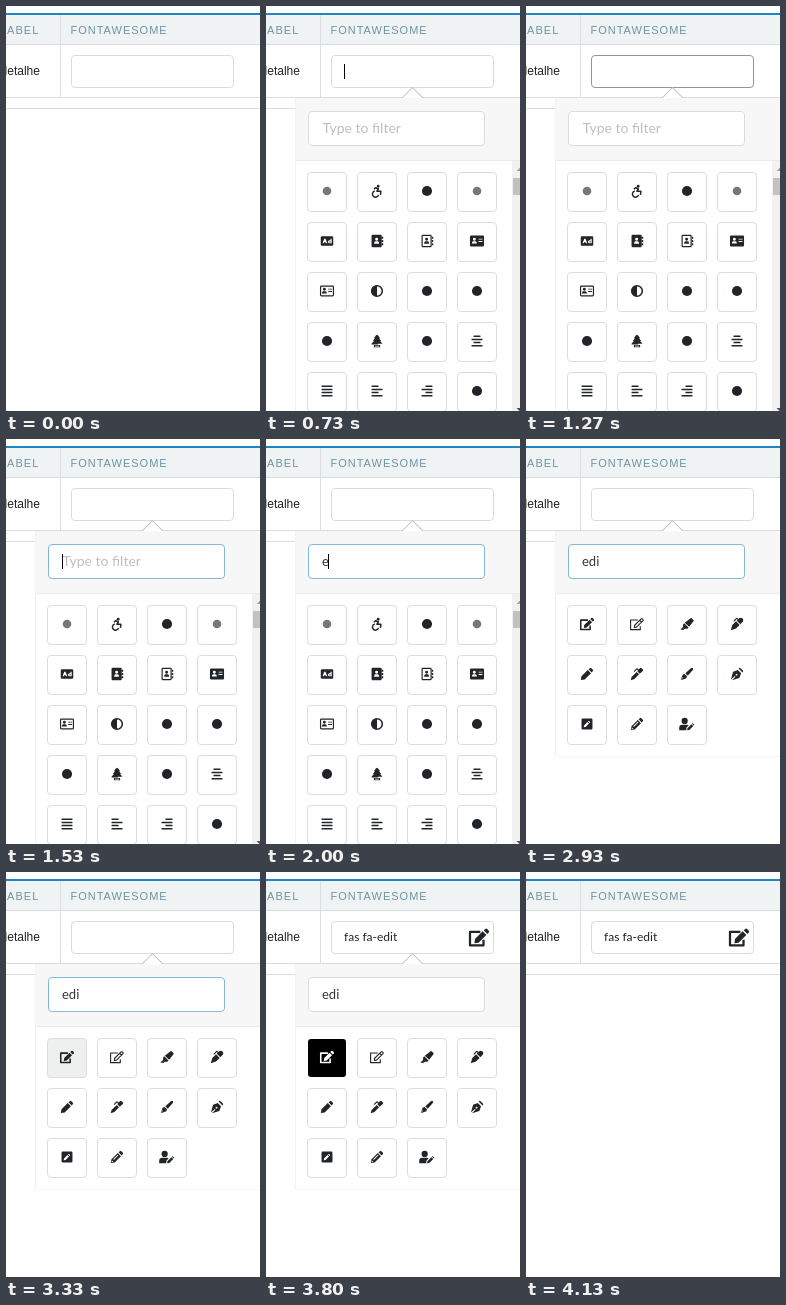
Recreate the animation shown at these times as an HTML page with a canvas. Size 254x405 px, loop 4.74 s.

```html
<!DOCTYPE html>
<html lang="pt">
<head>
<meta charset="utf-8">
<title>Icon picker</title>
<style>
  html, body { margin: 0; width: 100%; height: 100%; overflow: hidden; background: #fff; }
  canvas { display: block; }
</style>
</head>
<body>
<canvas id="stage" width="254" height="405"></canvas>
<script>
const ctx = document.getElementById('stage').getContext('2d', { alpha: false });
const LOOP = 4740;
const INK = '#212529';

// Icon geometry lives on a grid 16 units high.
const box = (x, y, w, h, r = 1.5) =>
  `M${x + r} ${y}h${w - 2 * r}q${r} 0 ${r} ${r}v${h - 2 * r}q0 ${r} ${-r} ${r}` +
  `h${2 * r - w}q${-r} 0 ${-r} ${-r}v${2 * r - h}q0 ${-r} ${r} ${-r}Z`;
const disc = (x, y, r) => `M${x - r} ${y}a${r} ${r} 0 1 0 ${2 * r} 0a${r} ${r} 0 1 0 ${-2 * r} 0Z`;
const person = (x, y) => disc(x, y, 1.9) + `M${x - 3.2} ${y + 5.6}q0-3 2-3h2.4q2 0 2 3Z`;
const bars = (shift, short = 9) =>
  [0, 1, 2, 3].map(i => box(i % 2 ? 0 : shift, 1 + 4 * i, i % 2 ? 14 : short, 2, .4)).join('');
const cap = 'M10 2 11.7.5Q12.7-.3 13.6.5L15.5 2.4Q16.3 3.3 15.5 4.3L14 6Z';
const tabs = [2.5, 6.7, 10.9].map(y => box(13.2, y, 1.8, 2.6, .3)).join('');

const icons = {
  disc: { fill: disc(8, 8, 6.5) },
  faintDisc: { fill: disc(8, 8, 5.5), tint: '#777' },
  wheelchair: {
    fill: disc(9.5, 1.9, 1.8),
    line: 'M4 5.5 6.5 3.8 9.8 5.4 7.8 8.3H13L12.4 13M5.2 8A4 4 0 1 0 10 13', width: 1.9
  },
  ad: {
    fill: box(0, 2, 16, 12) + 'M2.3 11 4.5 5H6.1L8.3 11H6.7L6.2 9.5H4.4L3.9 11Z' +
      'M14 5V11H11Q9.3 11 9.3 9 9.3 7 11 7H12.5V5ZM11.2 8.3H12.5V9.8H11.2Z'
  },
  book: { fill: box(0, 0, 13, 16) + person(6.5, 5.8) + tabs, w: 14 },
  bookOutline: { fill: person(6.5, 5.8) + tabs, line: box(.75, .75, 11.5, 14.5, 1), width: 1.5, w: 14 },
  card: { fill: box(0, 1, 18, 14) + person(5.6, 5.7) + box(11, 5, 5, 1.2, .2) + box(11, 8, 5, 1.2, .2), w: 18 },
  cardOutline: {
    fill: person(5.6, 5.7) + box(10.5, 5, 5, 1.2, .2) + box(10.5, 8, 5, 1.2, .2),
    line: box(.75, 1.75, 16.5, 12.5, 1), width: 1.5, w: 18
  },
  adjust: { fill: 'M8 1A7 7 0 0 0 8 15Z', line: disc(8, 8, 6.8), width: 2 },
  tree: {
    fill: 'M8 0 9.5.8 12 4.5H10.7L13.3 8H12L15 11.5H9.2V12.6H1V11.5L4 8H2.7L5.3 4.5H4L6.5.8Z' +
      'M4 13H12V16H4ZM5.4 14.1V14.9H10.6V14.1Z'
  },
  alignCenter: { fill: bars(2.5), w: 14 },
  justify: { fill: bars(0, 14), w: 14 },
  alignLeft: { fill: bars(0), w: 14 },
  alignRight: { fill: bars(5), w: 14 },
  edit: {
    fill: 'M12.3 2.5 15.5 5.7 8.6 12.6 5.2 13Q5 13 5 12.5L5.4 9.4Z' +
      'M13.2 1.6 14.5.4Q15.4-.3 16.2.4L17.7 1.9Q18.4 2.7 17.7 3.5L16.4 4.8Z',
    line: 'M10.2 3H1V15H13V10', width: 2, w: 18
  },
  editOutline: {
    line: 'M10 2.8H.8V15.2H13.2V11M5.6 12.4 6 9.6 14.3 1.3Q15 .6 15.7 1.3L16.7 2.3' +
      'Q17.4 3 16.7 3.7L8.4 12ZM12.4 3.2 14.8 5.6', width: 1.4, w: 18
  },
  highlighter: {
    fill: 'M0 15 2.6 12.4 5 14.7 4 15.8ZM3.5 8.5 5 7.1 10.4 12.4 9 14 6 14 4.7 14.8 2.7 12.8 3.5 11.5Z' +
      'M5.7 6.3 13 .5Q13.8 0 14.5.7L16.7 3Q17.4 3.7 16.8 4.5L11.2 11.6Z', w: 17
  },
  marker: {
    fill: 'M2 9.3 6.8 4.6 11.4 9.2 6.7 13.9 0 16ZM7.7 3.7 8.8 2.6 7.8 1.6 4.3 5.1 3.3 4.1 7 .4' +
      'Q7.8-.3 8.6.4L9.8 1.6 11.3.4Q13.2-.8 15.2.8 16.8 2.8 15.6 4.9L12.3 8.3Z'
  },
  pen: { fill: 'M9 3 13 7 5 15 .3 15.7Q0 15.8.2 15.4L.9 11Z' + cap },
  penAlt: {
    fill: 'M7.6 5.5 10.6 8.4 4.7 14.5 0 16 1 11.9Z' +
      'M8.5 4.5 9.2 3.4 8 2.3 4.7 5.5 3.7 4.5 7.2 1Q8 .3 8.8 1L10.1 2.3 11.8.6Q13-.3 14 .6L15.4 2Q16.3 3 15.4 4.2L11.5 7.6Z'
  },
  penFancy: { fill: 'M2.6 8.7 5 8 8 11 7.2 13.4 0 16 3.1 12.5 2.6 12 0 15.5ZM5.8 7 13 .6Q14.3-.5 15.6.5 16.6 1.7 15.4 3L9 10.2Z' },
  penNib: {
    fill: 'M10 1 11 .3Q11.8-.2 12.5.5L15.5 3.5Q16.2 4.2 15.7 5L15 6Z' +
      'M9 2.8 13.2 7 11 13 1.5 16 6 11.5 5.2 10.5.2 15 3 5Z' + disc(7.4, 8.8, 1.2)
  },
  penSquare: { fill: box(1, 1, 14, 14) + 'M8.5 5.5 10.5 7.5 6.2 11.8 3.8 12.2 4.2 9.8ZM9.3 4.7 10.3 3.8 12.2 5.7 11.3 6.7Z' },
  pencil: { fill: 'M9 3 13 7 5 15 .3 15.7.9 11ZM9 5 3 11 4.2 11.6 10 5.9ZM1.6 12.6 1.4 14.5 3.3 14.3Z' + cap },
  userEdit: {
    fill: disc(7, 4, 4) + 'M0 16V13Q0 9 4 9H10Q11.3 9 12.2 9.6L9.4 12.5 9 16Z' +
      'M15.6 8.3 18 10.7 13 15.6 10.2 16 10.5 13.3ZM16.3 7.6 17.2 6.8 19.6 9.2 18.7 10Z', w: 20
  }
};
for (const icon of Object.values(icons)) {
  icon.fill = icon.fill && new Path2D(icon.fill);
  icon.line = icon.line && new Path2D(icon.line);
}

const allIcons = ('faintDisc wheelchair disc faintDisc ad book bookOutline card cardOutline adjust ' +
  'disc disc disc tree disc alignCenter justify alignLeft alignRight disc').split(' ');
const edIcons = ('disc edit editOutline highlighter marker pen penAlt penFancy ' +
  'penNib penSquare pencil userEdit').split(' ');
const ediIcons = edIcons.slice(1);

function rect(x, y, w, h, color) {
  ctx.fillStyle = color;
  ctx.fillRect(x, y, w, h);
}

function frame(x, y, w, h, border, fill = '#fff') {
  ctx.beginPath();
  ctx.roundRect(x + .5, y + .5, w - 1, h - 1, 3.5);
  ctx.fillStyle = fill;
  ctx.fill();
  ctx.strokeStyle = border;
  ctx.lineWidth = 1;
  ctx.stroke();
}

function text(str, x, y, font, color, spacing = 0) {
  ctx.font = font;
  ctx.letterSpacing = spacing + 'px';
  ctx.fillStyle = color;
  ctx.fillText(str, x, y);
}

function triangle(x, y, halfWidth, height, color) {
  ctx.beginPath();
  ctx.moveTo(x, y);
  ctx.lineTo(x + halfWidth, y + height);
  ctx.lineTo(x - halfWidth, y + height);
  ctx.fillStyle = color;
  ctx.fill();
}

function drawIcon(name, cx, cy, size, color = INK) {
  const icon = icons[name];
  const s = size / 16;
  ctx.save();
  ctx.translate(cx - (icon.w || 16) * s / 2, cy - size / 2);
  ctx.scale(s, s);
  ctx.fillStyle = ctx.strokeStyle = icon.tint || color;
  ctx.lineWidth = icon.width || 1;
  ctx.lineJoin = 'round';
  if (icon.fill) ctx.fill(icon.fill, 'evenodd');
  if (icon.line) ctx.stroke(icon.line);
  ctx.restore();
}

function mix(a, b, k) {
  return `rgb(${a.map((v, i) => Math.round(v + (b[i] - v) * k))})`;
}

function fade(t, start) {
  return t < start ? 0 : t < start + 65 ? .25 : t < start + 130 ? .75 : 1;
}

const GREY = [218, 220, 220], DARK = [150, 150, 150], BLUE = [133, 183, 217];
const between = (t, a, b) => t >= a && t < b;

function drawPage(t) {
  rect(0, 0, 254, 405, '#fff');
  rect(0, 7, 254, 2, '#2185c5');
  rect(0, 9, 254, 29, '#eff3f3');
  rect(0, 38, 254, 1, '#d9dddd');
  rect(54, 9, 1, 82, '#dcdfdf');
  rect(0, 91, 254, 1, '#dcdcdc');
  rect(0, 102, 254, 1, '#dcdcdc');
  const head = '11px "Liberation Sans", Arial, sans-serif';
  text('LABEL', -6, 28, head, '#6d94a6', 1);
  text('FONTAWESOME', 64.5, 28, head, '#6d94a6', 1);
  text('detalhe', -5.4, 69, '12px "Liberation Sans", Arial, sans-serif', '#222');

  frame(65, 49, 163, 33, mix(GREY, DARK, fade(t, 735) - fade(t, 1400)));
  if (between(t, 730, 1270)) rect(78, 58, 1, 15, '#000');
  if (t >= 3800) {
    text('fas fa-edit', 78, 69, '12px Lato, sans-serif', '#222');
    drawIcon('edit', 213, 65.5, 18);
  }
}

function drawFilter(t) {
  const typed = t < 2000 ? '' : t < 2200 ? 'e' : t < 2400 ? 'ed' : 'edi';
  frame(42, 105, 177, 35, mix(GREY, BLUE, fade(t, 1400) - fade(t, 3600)));
  if (typed) text(typed, 56, 127, '13px Lato, sans-serif', '#333');
  else text('Type to filter', 56.5, 127, '14px Lato, sans-serif', '#bfbfbf');
  if (between(t, 1400, 2930) || between(t, 3470, 3600)) {
    rect([56, 62, 70, 73][typed.length], 115, 1, 15, '#000');
  }
}

function drawCells(t) {
  const names = t < 2330 ? allIcons : t < 2470 ? edIcons : ediIcons;
  names.forEach((name, i) => {
    const x = 41 + 50 * (i % 4), y = 166 + 50 * Math.floor(i / 4);
    const chosen = i === 0 && t >= 3730;
    if (chosen) {
      ctx.beginPath();
      ctx.roundRect(x + 1, y + 1, 38, 38, 3);
      ctx.fillStyle = '#000';
      ctx.fill();
    } else {
      frame(x, y, 40, 40, '#dcdcdc', i === 0 && t >= 3330 ? '#eeefef' : '#fff');
    }
    drawIcon(name, x + 20, y + 19, 12.5, chosen ? '#fff' : INK);
  });
}

function drawScrollbar() {
  rect(246, 155, 8, 250, '#f1f1f1');
  rect(247, 172, 7, 17, '#c1c1c1');
  triangle(254.5, 161, 4, 4, '#a3a3a3');
  triangle(254.5, 406, 4, -4, '#505050');
}

function drawPopup(t) {
  const long = t < 2330;
  const bottom = long ? 405 : 318;
  rect(29, 92, 225, bottom - 92, '#fff');
  rect(29, 92, 225, 62, '#f7f7f7');
  rect(29, 154, 225, 1, '#ebebeb');
  rect(29, 92, 1, bottom - 92, '#f2f2f2');
  if (!long) rect(29, 317, 225, 1, '#f5f5f5');
  triangle(146.5, 81, 11, 11, '#bfbfbf');
  triangle(146.5, 82.2, 10, 10, '#fff');
  drawFilter(t);
  drawCells(t);
  if (long) drawScrollbar();
}

function render(now) {
  const t = now % LOOP;
  drawPage(t);
  if (between(t, 730, 4130)) drawPopup(t);
}

const start = performance.now();
function tick() {
  render(performance.now() - start);
  requestAnimationFrame(tick);
}
tick();
</script>
</body>
</html>
```
